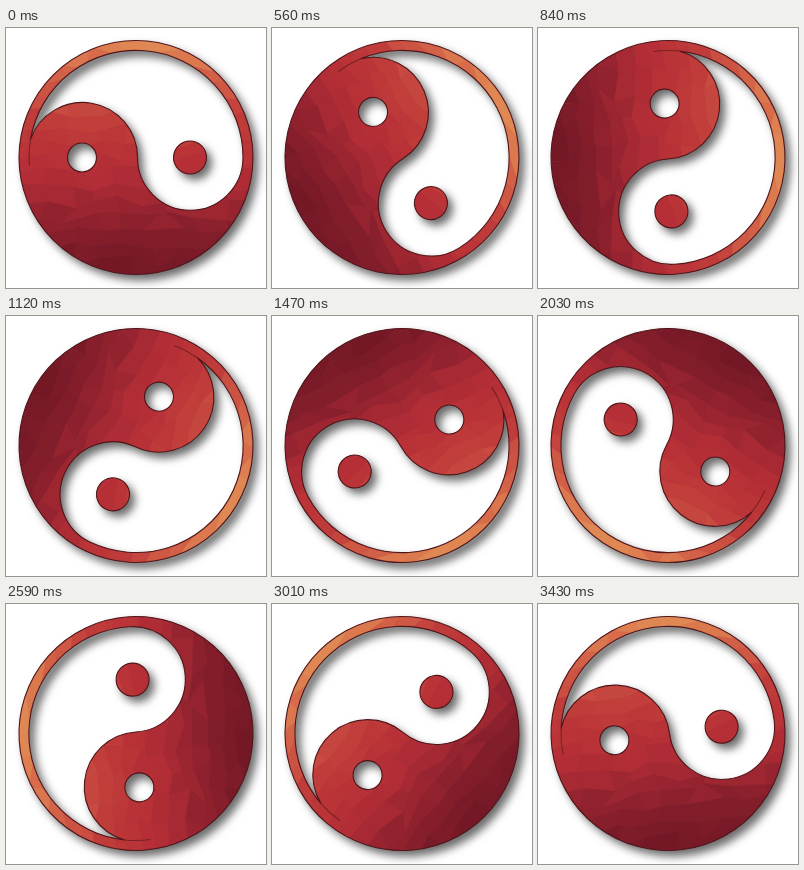
An HTML page for the animation above (3500 ms loop, 260 by 260 pixels).

```html
<!DOCTYPE html>
<html lang="en">
<head>
<meta charset="utf-8">
<title>Turning yin and yang</title>
<style>
  html, body { margin: 0; width: 100%; height: 100%; overflow: hidden; background: #fff; }
  svg { display: block; width: 100vw; height: 100vh; }
</style>
</head>
<body>
<svg viewBox="0 0 260 260">
  <defs>
    <filter id="shade" filterUnits="userSpaceOnUse" x="0" y="0" width="260" height="260" color-interpolation-filters="sRGB">
      <feDropShadow dx="5" dy="5.5" stdDeviation="4" flood-color="#000" flood-opacity=".58"/>
    </filter>
    <clipPath id="clip"><path id="body" clip-rule="evenodd"/><circle cx="54" r="16.5"/></clipPath>
  </defs>
  <g filter="url(#shade)">
    <g id="disc">
      <g clip-path="url(#clip)"><g id="facets" stroke-width=".6"></g></g>
      <g fill="none" stroke="#4f1519" stroke-width="1.1">
        <path id="edge"/>
        <circle cx="54" r="16.5"/>
        <path d="M-105.5-18A107 107 0 0 0-106.7 8" stroke-opacity=".6"/>
      </g>
    </g>
  </g>
</svg>
<script>
const LOOP = 3500, STEP = 70;
const el = id => document.getElementById(id);
const ring = r => `M${-r} 0A${r} ${r} 0 1 1 ${r} 0A${r} ${r} 0 1 1 ${-r} 0Z`;

// Full disc with the pale half and the small eye cut out
const shape = ring(117) +
  'M-105.5-18A107 107 0 0 1 107 0A52.75 52.75 0 0 1 1.5 0A55 55 0 0 0-105.5-18Z' +
  'M-68.5 0a14.5 14.5 0 1 1 29 0a14.5 14.5 0 1 1-29 0Z';
el('body').setAttribute('d', shape);
el('edge').setAttribute('d', shape);

let seed = 29;
const rand = () => (seed = (seed * 16807) % 2147483647) / 2147483647;

// Position from top to bottom, then the colour there
const stops = [
  [-118, 224, 138, 84], [-92, 215, 108, 74], [-58, 200, 74, 64], [-22, 189, 55, 56],
  [12, 181, 46, 54], [42, 160, 39, 50], [72, 137, 31, 44], [118, 114, 23, 37]
];
function tone(y) {
  y = Math.max(-118, Math.min(117.9, y));
  const i = stops.findIndex(s => s[0] > y);
  const a = stops[i - 1], b = stops[i], k = (y - a[0]) / (b[0] - a[0]);
  return `rgb(${[1, 2, 3].map(c => Math.round(a[c] + (b[c] - a[c]) * k))})`;
}

// Flat facets on a jittered grid
const COLS = 11, ROWS = 18, W = 26, H = 15;
const grid = [];
for (let r = 0; r <= ROWS; r++) {
  grid.push([]);
  for (let c = 0; c <= COLS; c++) {
    grid[r].push([(c - COLS / 2 + (rand() - .5) * .8) * W, (r - ROWS / 2 + (rand() - .5) * .9) * H]);
  }
}
let cells = '';
for (let r = 0; r < ROWS; r++) {
  for (let c = 0; c < COLS; c++) {
    const pts = [grid[r][c], grid[r][c + 1], grid[r + 1][c + 1], grid[r + 1][c]];
    const y = pts.reduce((sum, p) => sum + p[1], 0) / 4;
    const fill = tone(y + (rand() - .5) * 14);
    const line = pts.map(p => p.map(v => v.toFixed(1))).join(' ');
    cells += `<polygon points="${line}" fill="${fill}" stroke="${fill}"/>`;
  }
}
el('facets').innerHTML = cells;

const start = performance.now();
function draw(now) {
  const t = Math.max(0, now - start) % LOOP;
  const angle = Math.floor(t / STEP) * 360 * STEP / LOOP;
  el('disc').setAttribute('transform', `translate(130 129.5) rotate(${angle})`);
  requestAnimationFrame(draw);
}
draw(start);
</script>
</body>
</html>
```
